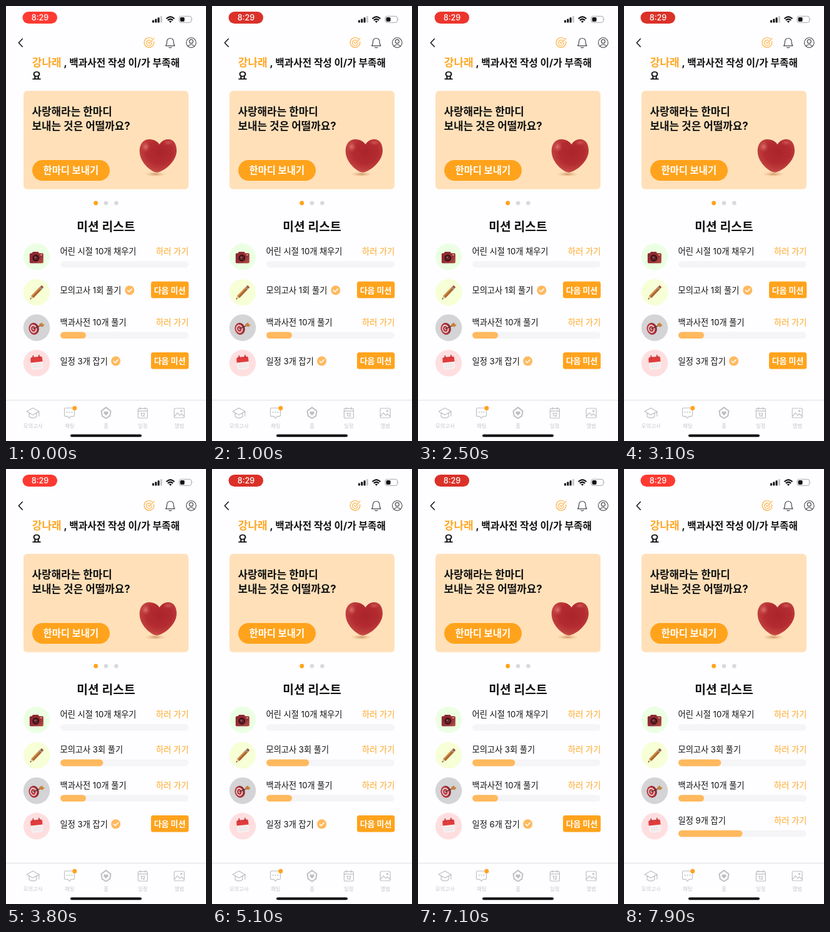
Write an HTML page that moves like this. It is 320x692 px and loops after 8000 ms.

```html
<!DOCTYPE html>
<html lang="ko">
<head>
<meta charset="utf-8">
<title>미션 리스트</title>
<style>
html, body { margin: 0; width: 100%; height: 100%; overflow: hidden; background: #fefdff; }
svg { display: block; width: 100vw; height: 100vh; }
text { font-family: Inter, "Noto Sans CJK KR", "Noto Sans CJK", sans-serif; fill: #111; }
.bold { font-weight: 700; }
.row { font-size: 13.2px; }
.go { font-size: 13.2px; fill: #ffa724; text-anchor: end; }
.next { font-size: 13px; font-weight: 700; fill: #fff; text-anchor: middle; }
.line { fill: none; stroke-linecap: round; stroke-linejoin: round; }
.tab { stroke: #bfbfc1; stroke-width: 1.2; }
.label { font-size: 8.4px; fill: #c6c6c8; text-anchor: middle; }

.pill { animation: pulse 1s ease-in-out infinite alternate; }
@keyframes pulse { from { fill: #ff3a32; } to { fill: #d93129; } }

.quizDone, .quizNext, .plan3, .plan6, .plan9 { animation: 8s step-end infinite; }
.quizDone { animation-name: quizDone; }
.quizNext { animation-name: quizNext; }
.plan3 { animation-name: plan3; }
.plan6 { animation-name: plan6; }
.plan9 { animation-name: plan9; }
@keyframes quizDone { 0% { opacity: 1; } 40%, 100% { opacity: 0; } }
@keyframes quizNext { 0% { opacity: 0; } 40%, 100% { opacity: 1; } }
@keyframes plan3 { 0% { opacity: 1; } 72.5%, 100% { opacity: 0; } }
@keyframes plan6 { 0% { opacity: 0; } 72.5% { opacity: 1; } 93.75%, 100% { opacity: 0; } }
@keyframes plan9 { 0% { opacity: 0; } 93.75%, 100% { opacity: 1; } }
</style>
</head>
<body>
<svg viewBox="0 0 320 692" preserveAspectRatio="none">
  <defs>
    <radialGradient id="heart" cx=".54" cy=".4" r=".62">
      <stop offset="0" stop-color="#a9252b"/>
      <stop offset=".55" stop-color="#b32b30"/>
      <stop offset=".85" stop-color="#c03f3e"/>
      <stop offset="1" stop-color="#cb544c"/>
    </radialGradient>
    <radialGradient id="shine">
      <stop offset="0" stop-color="#ea8a83" stop-opacity=".75"/>
      <stop offset="1" stop-color="#d0504d" stop-opacity="0"/>
    </radialGradient>
    <radialGradient id="shade">
      <stop offset="0" stop-color="#c98a58" stop-opacity=".85"/>
      <stop offset="1" stop-color="#e0b080" stop-opacity="0"/>
    </radialGradient>
    <linearGradient id="camera" y2="1">
      <stop offset="0" stop-color="#8a222a"/>
      <stop offset=".6" stop-color="#96303a"/>
      <stop offset="1" stop-color="#b5523f"/>
    </linearGradient>
  </defs>
  <rect width="320" height="692" fill="#fefdff"/>

  <!-- status bar -->
  <rect class="pill" x="26.5" y="9" width="55.5" height="19" rx="9.5"/>
  <text x="54.5" y="22.8" font-size="12.6" font-weight="500" text-anchor="middle" style="fill:#fff">8:29</text>
  <g fill="#111">
    <rect x="234" y="22.5" width="3" height="4" rx=".8"/>
    <rect x="238.3" y="20.5" width="3" height="6" rx=".8"/>
    <rect x="242.6" y="18.2" width="3" height="8.3" rx=".8"/>
    <rect x="246.9" y="16" width="3" height="10.5" rx=".8" fill="#c8c8ca"/>
  </g>
  <g class="line" stroke="#111" stroke-width="2.1" style="stroke-linecap:butt">
    <path d="M256.6 20.3Q263 14 269.4 20.3M258.9 22.8Q263 18.8 267.1 22.8"/>
    <path d="M263 26.8l-2.2-2.3q2.2-1.8 4.4 0z" fill="#111" stroke="none"/>
  </g>
  <rect x="277" y="16.3" width="19.6" height="10" rx="3" fill="none" stroke="#a5a5a7"/>
  <rect x="278.6" y="17.9" width="7" height="6.8" rx="1.6" fill="#111"/>
  <path d="M297.8 19.6q1.6 1.7 0 3.4z" fill="#a5a5a7"/>

  <!-- header -->
  <path class="line" d="M26.3 52.3L20.3 58.5L26.3 64.7" stroke="#111" stroke-width="1.5"/>
  <g class="line" stroke="#ffb041" stroke-width="1.15">
    <path d="M233.8 52A7.8 7.8 0 1 0 236.6 56.6M231.2 54.8A4.4 4.4 0 1 0 233.3 58"/>
    <path d="M227.2 57.6L229.2 59.6L237 51.2"/>
  </g>
  <g class="line" stroke="#4b4b4d" stroke-width="1.15">
    <path d="M255.6 63.3Q257.5 61.3 257.5 56.5A5.3 5.3 0 0 1 268.1 56.5Q268.1 61.3 270 63.3ZM260.8 65.7Q262.8 67.2 264.8 65.7"/>
    <circle cx="296.3" cy="58.3" r="7.8"/>
    <circle cx="296.3" cy="56.4" r="3"/>
    <path d="M291 63.9Q296.3 58.5 301.6 63.9"/>
  </g>
  <text class="bold" x="41.8" y="96" font-size="17" style="fill:#ffa724">강나래</text>
  <text class="bold" x="92.6" y="95.6" font-size="15.7">,</text>
  <text class="bold" x="101.2" y="95.6" font-size="15.75">백과사전 작성 이/가 부족해</text>
  <text class="bold" x="41.8" y="117" font-size="15.75">요</text>

  <!-- banner -->
  <rect x="28" y="135" width="264" height="156.5" rx="6" fill="#ffe0b9"/>
  <text class="bold" x="41.5" y="173.8" font-size="16.9">사랑해라는 한마디</text>
  <text class="bold" x="41.5" y="196.8" font-size="16.9">보내는 것은 어떨까요?</text>
  <rect x="42" y="245" width="124" height="33" rx="16.5" fill="#ffa31c"/>
  <text class="bold" x="103.8" y="267.3" font-size="15.4" text-anchor="middle" style="fill:#fff">한마디 보내기</text>
  <ellipse cx="239" cy="267.5" rx="17" ry="4" fill="url(#shade)"/>
  <path d="M241 264.8C234 264.8 214 250 213.7 231C213.5 219 220.5 212 229 212C237.5 212 242.5 215.8 245.6 220.2C248.5 215.2 254 211.5 260.5 212C269 212.6 273.2 220.5 273 230.5C272.5 249.5 249.5 264.8 241 264.8Z" fill="url(#heart)"/>
  <ellipse cx="223.5" cy="224" rx="8" ry="9" fill="url(#shine)"/>
  <ellipse cx="259" cy="217.5" rx="9" ry="5" fill="url(#shine)" opacity=".6"/>
  <circle cx="143.7" cy="313.5" r="3.4" fill="#ffa31c"/>
  <circle cx="160" cy="313.5" r="3.3" fill="#d9d9db"/>
  <circle cx="176.4" cy="313.5" r="3.3" fill="#d9d9db"/>
  <text class="bold" x="160" y="357.6" font-size="19.3" text-anchor="middle">미션 리스트</text>

  <!-- mission badges -->
  <g id="badges"></g>
  <g>
    <path d="M43 391h8.5l1.5 2.3h5q1.8 0 1.8 1.8v12.4q0 1.8-1.8 1.8h-18.4q-1.8 0-1.8-1.8v-12.4q0-1.8 1.8-1.8h2z" fill="url(#camera)"/>
    <circle cx="47.8" cy="401" r="5.4" fill="#3a1216"/>
    <circle cx="47.8" cy="401" r="3.3" fill="#64242c"/>
    <circle cx="46.8" cy="399.8" r="1.1" fill="#b07278"/>
    <rect x="54.6" y="394.8" width="3.4" height="2.2" rx=".8" fill="#e08a55"/>
  </g>
  <g transform="translate(48.8 456) rotate(-46)">
    <path d="M-15 0l5.5-2.5v5z" fill="#e9c79c"/>
    <path d="M-15 0l2.2-1v2z" fill="#33231e"/>
    <rect x="-9.5" y="-2.5" width="18.5" height="5" fill="#a9652f"/>
    <rect x="-9.5" y="-2.5" width="18.5" height="2" fill="#d08f4b"/>
    <rect x="9" y="-2.5" width="2" height="5" fill="#8f8f8b"/>
    <rect x="11" y="-2.5" width="3.2" height="5" rx="1.5" fill="#a7503f"/>
  </g>
  <g>
    <g transform="translate(43.8 513.6) rotate(-14)">
      <ellipse cx="1" rx="7.8" ry="9.4" fill="#7f2029"/>
      <ellipse rx="7.2" ry="9" fill="#b8343d"/>
      <ellipse rx="5.3" ry="6.7" fill="#e6d3d2"/>
      <ellipse rx="3.7" ry="4.7" fill="#b8343d"/>
      <ellipse rx="1.5" ry="2" fill="#ecd9d6"/>
    </g>
    <path d="M44 513.5L57 507.5" class="line" stroke="#5b3434" stroke-width="1.5"/>
    <path d="M52.5 509.3l1.2-3.6 4.3-2.2.5 2.6 3.2 1-3 3.3z" fill="#c5813f"/>
  </g>
  <g transform="rotate(-6 49 568)">
    <rect x="39.8" y="558" width="19" height="20.3" rx="3.4" fill="#f5efef"/>
    <path d="M39.8 566.6v-5.2q0-3.4 3.4-3.4h12.2q3.4 0 3.4 3.4v5.2z" fill="#e03c3c"/>
    <path d="M44.5 556v4M54 556v4" class="line" stroke="#b53137" stroke-width="1.7"/>
    <path d="M43.5 570.3h12M43.5 574h12" stroke="#e6d9d9" stroke-width="1.4" stroke-dasharray="2.2 1.4"/>
  </g>
  <g id="missions"></g>

  <!-- tab bar -->
  <rect y="626.6" width="320" height="1" fill="#dededf"/>
  <g class="line tab">
    <path d="M33 645L43 639.5L53 645L43 650.5ZM37 647.5V653.2Q43 657.6 49 653.2V647.5M52.8 645.3V652.5"/>
    <path d="M95.3 639.5H107.7Q109.5 639.5 109.5 641.3V651Q109.5 652.8 107.7 652.8H104L101.5 655.8L99 652.8H95.3Q93.5 652.8 93.5 651V641.3Q93.5 639.5 95.3 639.5Z"/>
    <path d="M97.6 646.3h.1M101.5 646.3h.1M105.4 646.3h.1" stroke-width="1.9"/>
    <path d="M160 638.6L167.6 644.2L166.2 652.2L160 656L153.8 652.2L152.4 644.2Z" stroke-width="2"/>
    <path d="M160 651.4L156.6 648Q155.8 645.2 158 644.7Q159.3 644.6 160 646Q160.7 644.6 162 644.7Q164.2 645.2 163.4 648Z" fill="#bfbfc1" stroke="none"/>
    <rect x="211.4" y="640.3" width="15" height="15.2" rx="1.6"/>
    <path d="M211.4 644.3H226.4M215 638.6V641.6M222.8 638.6V641.6"/>
    <rect x="269.2" y="640" width="16" height="15" rx="1.6"/>
    <path d="M269.6 652.6L274.2 647.2L278 651.2L280.6 648.8L285 652.6"/>
    <circle cx="280.6" cy="644.3" r="1.1"/>
  </g>
  <text x="218.9" y="653.4" font-size="7.2" font-weight="700" text-anchor="middle" style="fill:#b4b4b6">12</text>
  <circle cx="109.8" cy="639.8" r="3.5" fill="#ffa31c"/>
  <g id="labels"></g>
  <rect x="103" y="681.4" width="114" height="4" rx="2" fill="#050505"/>
</svg>
<script>
const rowY = i => 399 + i * 56.35;
const put = (id, html) => document.getElementById(id).innerHTML = html.join('');

const active = (i, name, part, cls = '') => {
  const y = rowY(i);
  const bar = (w, fill) => `<rect x="87" y="${y + 6.7}" width="${w}" height="10.6" rx="5.3" fill="${fill}"/>`;
  return `<g class="${cls}"><text class="row" x="86.6" y="${y - 4}">${name}</text>
    <text class="go" x="292.3" y="${y - 4}">하러 가기</text>
    ${bar(205, '#f5f4f6')}${part ? bar(205 * part, '#ffb95e') : ''}</g>`;
};

const done = (i, name, checkX, cls) => {
  const y = rowY(i);
  return `<g class="${cls}"><text class="row" x="86.6" y="${y + 1.8}">${name}</text>
    <circle cx="${checkX}" cy="${y - 3.2}" r="7.5" fill="#ffb95e"/>
    <path class="line" d="M${checkX - 3.2} ${y - 3}l2.4 2.4l4.2-4.6" stroke="#fff" stroke-width="1.6"/>
    <rect x="232" y="${y - 17}" width="60.3" height="26.4" rx="3.5" fill="#ffa31c"/>
    <text class="next" x="262.1" y="${y + 1.2}">다음 미션</text></g>`;
};

put('badges', ['#ebffe3', '#f6ffd5', '#d4d3d5', '#ffdedf'].map((fill, i) =>
  `<circle cx="49" cy="${rowY(i)}" r="21.2" fill="${fill}"/>`));

put('missions', [
  active(0, '어린 시절 10개 채우기', 0),
  done(1, '모의고사 1회 풀기', 197.8, 'quizDone'),
  active(1, '모의고사 3회 풀기', 1 / 3, 'quizNext'),
  active(2, '백과사전 10개 풀기', .2),
  done(3, '일정 3개 잡기', 175.6, 'plan3'),
  done(3, '일정 6개 잡기', 175.6, 'plan6'),
  active(3, '일정 9개 잡기', .5, 'plan9')
]);

put('labels', ['모의고사', '채팅', '홈', '일정', '앨범'].map((name, i) =>
  `<text class="label" x="${43.2 + i * 58.5}" y="670.6">${name}</text>`));
</script>
</body>
</html>
```
